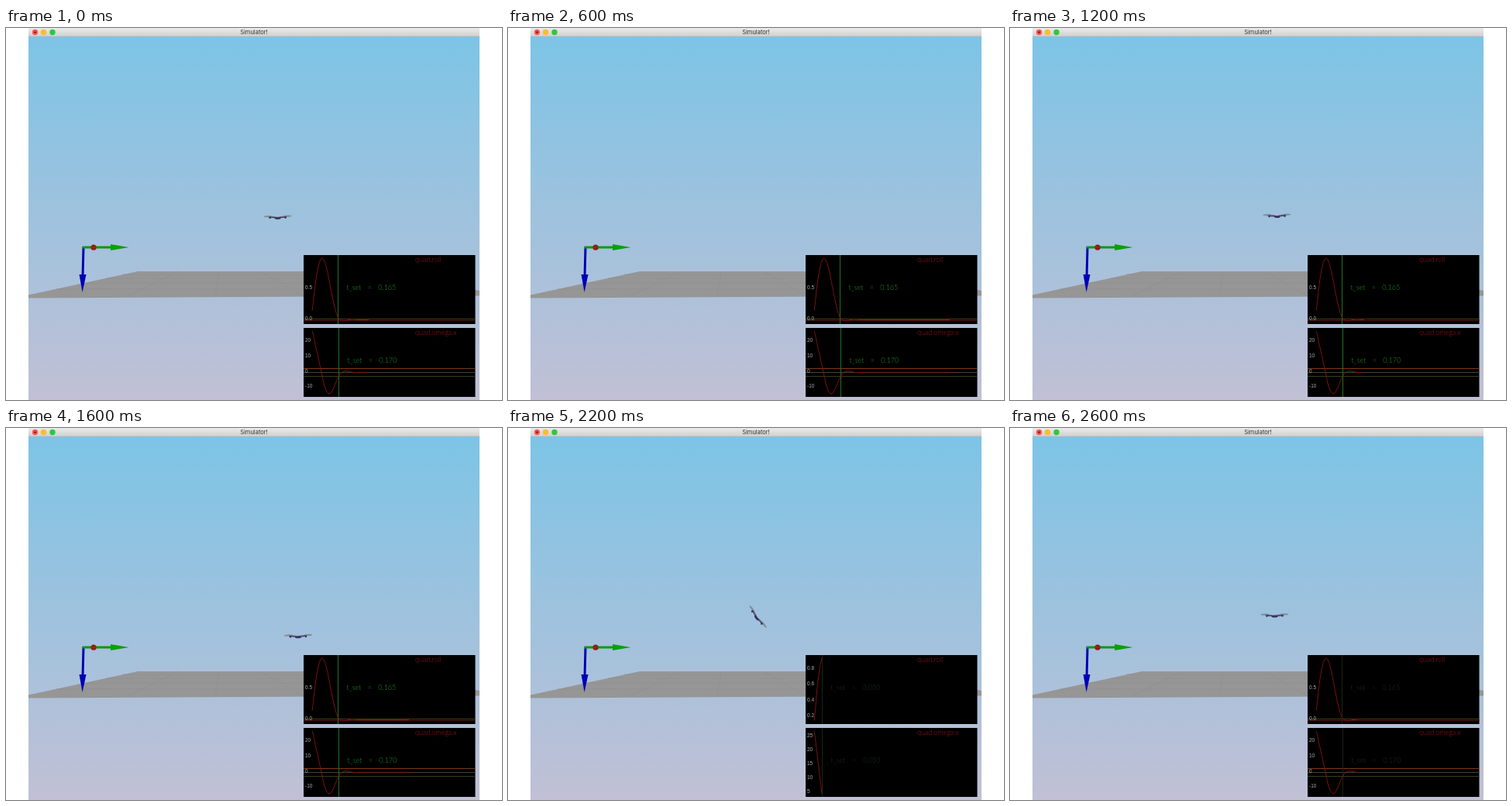
These frames come from a looping animation (640x480 px, 2.8 s). An HTML page with a canvas:

```html
<!DOCTYPE html>
<html lang="en">
<head>
<meta charset="utf-8">
<title>Simulator!</title>
<style>
html, body { margin: 0; width: 100%; height: 100%; overflow: hidden; background: #fff; }
canvas { display: block; }
</style>
</head>
<body>
<canvas id="stage" width="640" height="480"></canvas>
<script>
const ctx = document.getElementById('stage').getContext('2d');
const STEP = 200, STEPS = 14;
const START = 395, SPACING = 4, PIXELS_PER_SECOND = 200;

const plots = [
  {
    title: 'quad.roll', top: 293, settle: 0.165, digits: 1, labelShift: 0,
    samples: [.13, .55, .84, .965, .92, .74, .48, .24, .06, -.02, -.035, -.03, -.018, -.012, -.015, -.02],
    tick: range => range > .95 ? .5 : .2,
    limits: [[.005, '#4a3c12'], [-.03, '#4c1810']]
  },
  {
    title: 'quad.omega.x', top: 387, settle: 0.17, digits: 0, labelShift: -2,
    samples: [27.2, 18.6, 9.4, 0, -9, -13.4, -13.6, -10, -5, -1.2, .5, .9, .4, 0, -.1, 0],
    tick: range => range > 30 ? 10 : 5,
    limits: [[2.6, '#7a3a12'], [0, '#40443c'], [-2.6, '#383c1c']]
  }
];

// Catmull-Rom through evenly spaced samples, constant past the end
function sample(values, x) {
  const pos = Math.max(0, (x - START) / SPACING), i = Math.floor(pos), f = pos - i;
  const at = k => values[Math.min(values.length - 1, Math.max(0, k))];
  const [a, b, c, d] = [at(i - 1), at(i), at(i + 1), at(i + 2)];
  return b + f / 2 * (c - a + f * (2 * a - 5 * b + 4 * c - d + f * (3 * (b - c) + d - a)));
}

function polygon(color, ...points) {
  ctx.fillStyle = color;
  ctx.beginPath();
  points.forEach(([x, y]) => ctx.lineTo(x, y));
  ctx.fill();
}

function line(color, x1, y1, x2, y2, width = 1) {
  ctx.strokeStyle = color;
  ctx.lineWidth = width;
  ctx.beginPath();
  ctx.moveTo(x1, y1);
  ctx.lineTo(x2, y2);
  ctx.stroke();
}

function oval(color, x, y, rx, ry = rx) {
  ctx.fillStyle = color;
  ctx.beginPath();
  ctx.ellipse(x, y, rx, ry, 0, 0, 2 * Math.PI);
  ctx.fill();
}

function text(value, x, y, color, font, spacing = '0px') {
  ctx.font = font;
  ctx.fillStyle = color;
  ctx.wordSpacing = spacing;
  ctx.fillText(value, x, y);
}

function verticalGradient(y1, y2, from, to) {
  const gradient = ctx.createLinearGradient(0, y1, 0, y2);
  gradient.addColorStop(0, from);
  gradient.addColorStop(1, to);
  return gradient;
}

function drawScene() {
  ctx.fillStyle = '#fff';
  ctx.fillRect(0, 0, 640, 480);
  ctx.fillStyle = verticalGradient(11, 480, '#7dc4e6', '#c1c0d5');
  ctx.fillRect(29, 11, 582, 469);

  polygon('#969696', [29, 344.5], [170, 314], [500, 314], [611, 339], [611, 345.5], [29, 348.5]);
  for (const [y, x] of [[318, 150], [323, 129], [329, 101], [337, 64]]) line('#8d8d8d', x, y, 500, y, .6);
  for (const [x1, x2] of [[222, 155], [275, 270], [329, 386]]) line('#8d8d8d', x1, 314, x2, 347, .6);

  line('#0000b4', 100, 282, 99, 320, 3);
  polygon('#0000b4', [94.5, 318], [103.5, 318], [98.6, 341]);
  line('#0a9c0a', 99, 283, 136, 283, 3);
  polygon('#0aa00a', [135, 279], [158.5, 283], [135, 287]);
  oval('#a01414', 113, 283.2, 3.6);
  line('#0a7c0a', 109, 283, 117, 283, 1);

  ctx.fillStyle = verticalGradient(0, 11, '#ebebeb', '#cfcfcf');
  ctx.fillRect(29, 0, 582, 11);
  line('#b0b0b0', 29, 11, 611, 11, .6);
  oval('#f9564f', 37.5, 5.5, 3.7);
  oval('#6e1010', 37.5, 5.5, 1.2);
  oval('#fcbc2f', 48.5, 5.5, 3.7);
  oval('#2fc73f', 60, 5.5, 3.7);
  ctx.textAlign = 'center';
  text('Simulator!', 320, 6, '#333', '7.5px Inter, sans-serif');
  ctx.textAlign = 'left';
}

function drawDrone(p) {
  const x = p < 450 ? 322 + (p - 405) * .42 : 341.5 + (p - 450) * .505;
  const y = 241.3 + (p < 446 ? .0016 : .0049) * (p - 446) ** 2;
  ctx.save();
  ctx.translate(x, y);
  ctx.rotate(sample(plots[0].samples, p));
  for (const side of [-1, 1]) {
    oval('#858d96', side * 12.5, -.8, 5.5, 1.2);
    oval('#69727c', side * 7, .2, 5, 1);
    line('#2a2a78', side * 10, -.2, side * 10, 2.2, 2);
    line('#3a3a58', 0, 1.6, side * 11, .2, 1);
  }
  oval('#30306c', 0, 1.7, 4, 1.5);
  line('#8a3038', -2, .8, 2, .8, .8);
  ctx.restore();
}

function drawPlot(plot, p, dim) {
  const { top, samples } = plot;
  const curve = [];
  for (let x = START; x <= p; x++) curve.push([x, sample(samples, x)]);
  const values = curve.map(point => point[1]);
  const min = Math.min(...values), max = Math.max(...values);
  const toY = v => top + 4 + (max - v) / (max - min) * 80.8;

  ctx.save();
  ctx.beginPath();
  ctx.rect(384, top, 221.5, 89);
  ctx.clip();
  ctx.fillStyle = '#000';
  ctx.fillRect(384, top, 222, 89);

  for (const [value, color] of plot.limits) {
    if (value >= min && value <= max) {
      const y = Math.round(toY(value)) + .5;
      line(color, 384, y, 606, y);
    }
  }

  const settle = Math.min(plot.settle, (p - START) / PIXELS_PER_SECOND);
  const settleX = Math.floor(START + settle * PIXELS_PER_SECOND) + .5;
  line(dim ? '#182618' : '#1f7422', settleX, top, settleX, top + 89);

  ctx.strokeStyle = '#8c1212';
  ctx.lineWidth = .9;
  ctx.beginPath();
  curve.forEach(([x, v]) => ctx.lineTo(x, toY(v)));
  ctx.stroke();

  const tick = plot.tick(max - min);
  for (let k = Math.ceil(min / tick); k * tick <= max; k++) {
    text((k * tick).toFixed(plot.digits), 386, toY(k * tick) + plot.labelShift + .5,
      '#aaa', '6.5px "Liberation Sans", sans-serif');
  }
  text(plot.title, 528, top + 6.5, '#a01616', '300 9px Lato, sans-serif');
  text('t_set = ' + settle.toFixed(3), settleX + 11, top + 42, dim ? '#1c2c1e' : '#229428',
    '300 9px Lato, sans-serif', '6px');
  ctx.restore();
}

// Right end of the curves: one run finishing, one whole run, one starting
function progress(step) {
  if (step < 5) return 468 + 34.2 * step;
  if (step < 11) return 424 + 32 * (step - 5);
  return 405 + 22.5 * (step - 11);
}

function frame() {
  const step = Math.floor(performance.now() / STEP) % STEPS;
  const p = progress(step);
  const dim = step === 5 || step > 10;
  drawScene();
  drawDrone(p);
  plots.forEach(plot => drawPlot(plot, p, dim));
  requestAnimationFrame(frame);
}

ctx.textBaseline = 'middle';
frame();
</script>
</body>
</html>
```
